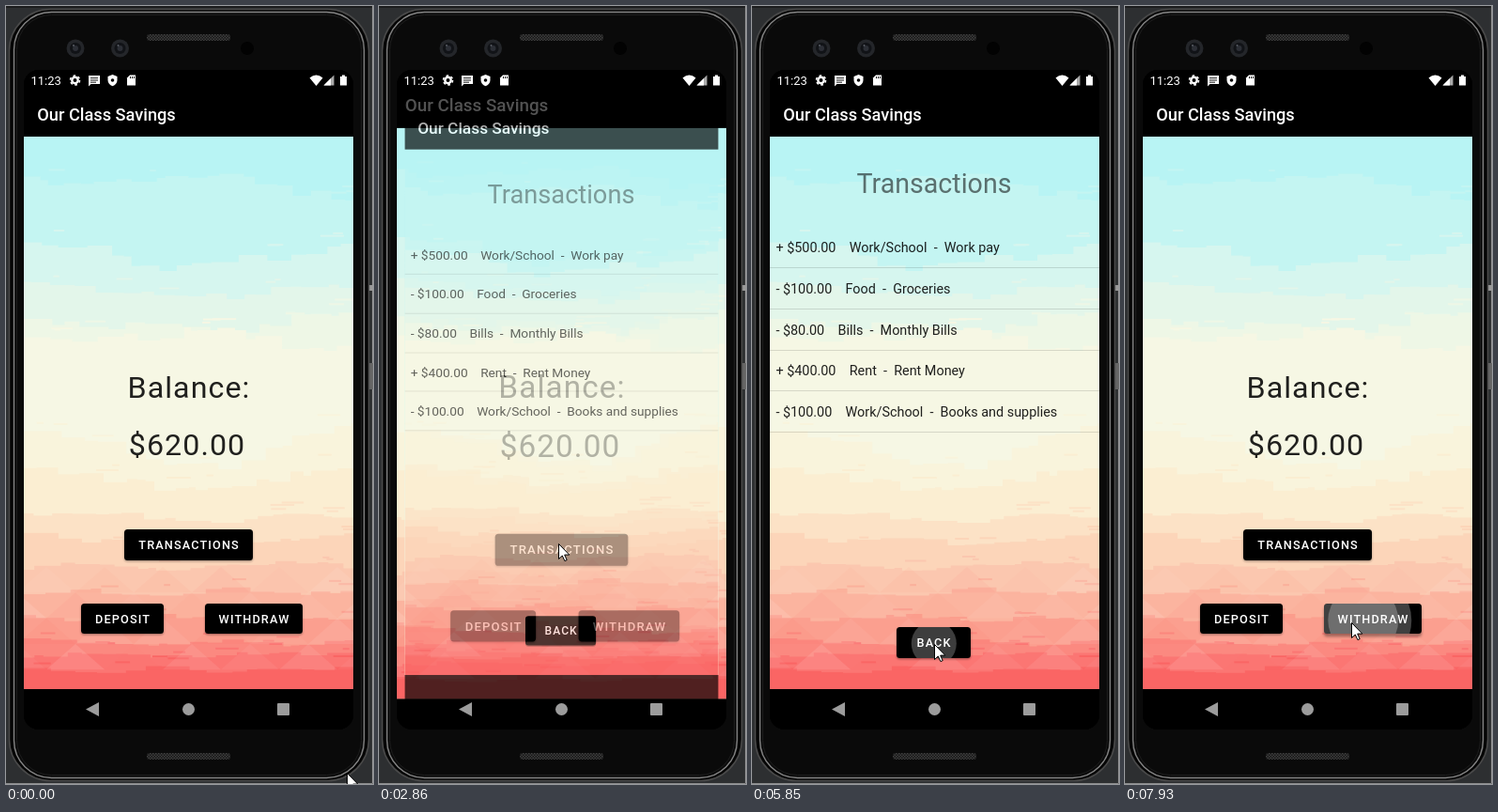
Recreate the animation shown at these times as an HTML page. Size 391 by 828 pixels, loop 8 s.

```html
<!DOCTYPE html>
<html lang="en">
<head>
<meta charset="utf-8">
<title>Balance app</title>
<style>
  html, body { margin: 0; width: 100%; height: 100%; overflow: hidden; background: #2d2f31; }
  svg { display: block; }
  text { font-family: Roboto, "Open Sans", sans-serif; white-space: pre; }
  .title { font-size: 18.2px; font-weight: 500; fill: #fff; }
  .big { font-size: 32.2px; letter-spacing: .033em; fill: #000; fill-opacity: .87; text-anchor: middle; }
  .head { font-size: 28.6px; fill: #000; fill-opacity: .54; text-anchor: middle; }
  .row { font-size: 14.4px; fill: #000; fill-opacity: .87; }
  .label { font-size: 12.7px; font-weight: 500; letter-spacing: .0893em; fill: #fff; text-anchor: middle; }
  .clock { font-size: 13px; fill: #fff; }
</style>
</head>
<body>
<svg width="391" height="828" viewBox="0 0 391 828">
  <defs>
    <clipPath id="glass"><rect x="19" y="68" width="351" height="702" rx="16"/></clipPath>
    <clipPath id="page"><rect x="19" y="139" width="351" height="588"/></clipPath>
    <pattern id="mesh" width="3" height="3" patternUnits="userSpaceOnUse">
      <rect width="3" height="3" fill="#151515"/>
      <path d="M0 0h1.5v1.5h-1.5zM1.5 1.5h1.5v1.5h-1.5z" fill="#3f3f3f"/>
    </pattern>
  </defs>

  <!-- phone body -->
  <rect width="391" height="2" fill="#1c1d1e"/>
  <path d="M390.5 0V827.5H0" fill="none" stroke="#8a8a8a"/>
  <rect x="387" y="297" width="4" height="6" fill="#999"/>
  <rect x="387" y="380" width="4" height="28" fill="#666"/>
  <rect x="3.5" y="3.5" width="383" height="821" rx="44" fill="#050505" stroke="#4a4a4a" stroke-width="1.5"/>
  <rect x="8.5" y="6.500" width="373" height="815" rx="40" fill="#0a0a0a" stroke="#858585" stroke-width="1.4"/>
  <rect x="11.500" y="9.500" width="367" height="809" rx="37" fill="#0a0a0a" stroke="#1d1d1d"/>
  <rect x="150" y="30" width="89" height="7" rx="3" fill="url(#mesh)"/>
  <rect x="150" y="795" width="89" height="7" rx="3" fill="url(#mesh)"/>
  <g id="lenses"></g>
  <circle cx="257" cy="45" r="7" fill="#020202"/>

  <!-- screen -->
  <g clip-path="url(#glass)">
    <rect x="19" y="68" width="351" height="702"/>
    <g id="windows"></g>
    <text class="clock" x="26.5" y="83.6">11:23</text>
    <g fill="#fff">
      <circle cx="73.5" cy="79" r="3.2" fill="none" stroke="#fff" stroke-width="2.4"/>
      <circle cx="73.5" cy="79" r="5" fill="none" stroke="#fff" stroke-width="1.6" stroke-dasharray="2.6 2.636"/>
      <path d="M88 74h12v9h-9.5l-2.5 2.5z"/>
      <path d="M90 76.7h8M90 79h8M90 81.2h6" stroke="#000" stroke-width=".9"/>
      <path d="M113.5 73l5 2v4c0 3-2 5-5 6.2c-3-1.2-5-3.2-5-6.2v-4z"/>
      <circle cx="113.5" cy="79" r="1.8" fill="#000"/>
      <path d="M132 73.5h6v11h-9v-8z"/>
      <path d="M132.5 75v2.2M134.5 75v2.2M136.5 75v2.2" stroke="#000" stroke-width=".9"/>
      <path d="M323.5 76.5q7-6 14 0l-7 8.5z"/>
      <path d="M349.5 73.5v11h-11z" fill="#aaa"/>
      <path d="M346 77v7.5h-7.5z"/>
      <path d="M356 75h2v-1.5h3v1.5h2v9.5h-7z"/>
    </g>
    <g fill="#9c9c9c">
      <path d="M85 748.5L99 741V756Z"/>
      <circle cx="194.5" cy="748.5" r="6.5"/>
      <rect x="289" y="742" width="13" height="13" rx="1"/>
    </g>
  </g>
  <path id="pointer" d="M.5 .5V16.5L4.3 13 6.9 18.6 9.2 17.6 6.7 12.1H11.8Z" fill="#fff" stroke="#000"/>
</svg>

<script>
const $ = id => document.getElementById(id);
const clamp = v => Math.max(0, Math.min(1, v));
const mix = (a, b, k) => a + (b - a) * k;
const LOOP = 8000;

// ---- Painted backdrop ----
let seed = 11;
const rnd = () => (seed = (seed * 16807) % 2147483647) / 2147483647;

// colour, then edge heights at even steps from left to right
const bands = [
  ['#c4f5f2', 186, 190, 184, 180, 198, 204],
  ['#d6f6ef', 250, 256, 284, 270, 265, 250],
  ['#e3f6ea', 298, 300, 308, 310, 300, 296],
  ['#eef7e6', 330, 344, 336, 350, 332, 324],
  ['#f6f7e4', 354, 356, 350, 342, 368, 360],
  ['#f9f4dc', 452, 462, 486, 492, 462, 442],
  ['#fbeed2', 490, 500, 512, 510, 500, 486],
  ['#fce2c6', 542, 538, 546, 550, 540, 544],
  ['#fcd5b9', 562, 570, 566, 574, 568, 562],
  ['#fbc7af', 598, 592, 600, 596, 590, 598],
  ['#fbb49f', 624, 622, 628, 620, 626, 622],
  ['#fb9f8f', 650, 654, 648, 656, 650, 652],
  ['#fb8980', 672, 678, 680, 676, 680, 674],
  ['#fb7673', 692, 688, 694, 690, 688, 692],
  ['#fa6564', 706, 708, 704, 708, 706, 704]
];

function backdrop() {
  let s = '<rect x="19" y="139" width="351" height="588" fill="#b8f4f4"/>';
  for (const [color, ...ys] of bands) {
    const rough = ys[0] < 540 ? 9 : 5;
    let d = 'M19 727', x = 19;
    while (x < 370) {
      const u = (x - 19) / 351 * 5, i = Math.min(4, Math.floor(u));
      const y = mix(ys[i], ys[i + 1], u - i) + (rnd() - .5) * rough;
      d += `V${y.toFixed(1)}`;
      x = Math.min(370, x + 7 + rnd() * 24);
      d += `H${x.toFixed(1)}`;
    }
    s += `<path d="${d}V727Z" fill="${color}"/>`;
    for (let n = 0; n < 5; n++) {
      const i = Math.floor(rnd() * 6);
      s += `<rect x="${(19 + i * 62 + rnd() * 40).toFixed(1)}" y="${(ys[i] - 5 - rnd() * 8).toFixed(1)}"
        width="${(6 + rnd() * 20).toFixed(1)}" height="2" fill="${color}"/>`;
    }
  }
  // faint triangle mosaic in the lower part
  for (let r = 0; r < 4; r++) {
    const top = 597 + r * 27.3, low = top + 27.3;
    for (let c = -1; c < 7; c++) {
      const x = 12 + c * 62 + (r % 2) * 31;
      const tint = rnd() < .4 ? '#fff' : '#f65f58';
      s += `<path d="M${x} ${low}L${x + 31} ${top}L${x + 62} ${low}Z"
        fill="${tint}" opacity="${(.03 + rnd() * .07).toFixed(2)}"/>`;
    }
  }
  return s;
}

// ---- Windows ----
const painted = backdrop();

const button = (id, x, y, w, h, label) => {
  const box = `x="${x}" y="${y}" width="${w}" height="${h}" rx="3.5"`;
  return `<clipPath id="${id}Clip"><rect ${box}/></clipPath>
    <rect id="${id}Shade" ${box} opacity=".35"/>
    <rect id="${id}Face" ${box}/>
    <g clip-path="url(#${id}Clip)" fill="#fff">
      <circle id="${id}Halo" opacity="0"/>
      <circle id="${id}Ring" opacity="0"/>
    </g>
    <text class="label" x="${x + w / 2 + .6}" y="${y + h / 2 + 4.6}">${label}</text>`;
};

const appWindow = (id, content) => `<g id="${id}">
  <g clip-path="url(#page)">${painted}</g>
  <rect x="19" y="68" width="351" height="71"/>
  <rect x="19" y="727" width="351" height="43"/>
  <text class="title" x="33.3" y="121.7">Our Class Savings</text>
  ${content}</g>`;

const rows = [
  '+ $500.00    Work/School  -  Work pay',
  '- $100.00    Food  -  Groceries',
  '- $80.00    Bills  -  Monthly Bills',
  '+ $400.00    Rent  -  Rent Money',
  '- $100.00    Work/School  -  Books and supplies'
].map((line, i) => `<text class="row" x="25.4" y="${262 + i * 43.8}">${line}</text>
  <rect x="19" y="${Math.round(278 + i * 43.8)}" width="351" height="1" opacity=".13"/>`).join('');

$('windows').innerHTML =
  appWindow('home', `
    <text class="big" x="195" y="417">Balance:</text>
    <text class="big" x="193" y="478">$620.00</text>` +
    button('list', 126, 557, 137, 33, 'TRANSACTIONS') +
    button('deposit', 80, 636, 88, 32, 'DEPOSIT') +
    button('withdraw', 212, 636, 104, 32, 'WITHDRAW')) +
  appWindow('history', `<text class="head" x="194" y="198.8">Transactions</text>${rows}` +
    button('back', 154, 661, 79, 33, 'BACK'));

$('lenses').innerHTML = [74, 121.5].map(x =>
  `<circle cx="${x}" cy="45" r="9.5" fill="#24262a"/><circle cx="${x}" cy="45" r="6" fill="#111317"/>
   <circle cx="${x}" cy="45" r="3" fill="#2c2f36"/><circle cx="${x - 2}" cy="42" r="1" fill="#5a5e66"/>`).join('');

const ticks = [0, 570, 690, 820, 940, 1090, 1210, 1350, 1480, 1600, 1730, 1850, 2000,
  2290, 2420, 2560, 2710, 2860, 3010, 3130, 4280, 4430, 4560, 4730, 4880, 5000,
  5850, 5980, 6100, 6250, 6380, 6510, 6660, 6780, 7070, 7220, 7340, 7490, 7930];

// pointer: time, x, y
const trail = [
  [440, 363, 816], [940, 311, 785], [1210, 268, 745], [1850, 192, 577], [2000, 191, 572],
  [4130, 191, 572], [4280, 191, 580], [4560, 191, 617], [4730, 191, 650], [5000, 194, 679],
  [6930, 194, 679], [7070, 198, 679], [7340, 231, 662], [7490, 241, 656]
];

const presses = [
  { id: 'list', at: 2198, hold: 270, x: 191, y: 573 },
  { id: 'back', at: 5766, hold: 420, x: 194, y: 679 },
  { id: 'withdraw', at: 7805, hold: 300, x: 241, y: 656 },
  { id: 'deposit', at: LOOP, hold: 0, x: 0, y: 0 }
];

const cubic = (a, b, c, d, s) => {
  const r = 1 - s;
  return a * r * r * r + 3 * b * r * r * s + 3 * c * r * s * s + d * s * s * s;
};

// fast start, very long settle
function ease(x) {
  const [px, py] = x < 1 / 6
    ? [[0, .05, .1333, 1 / 6], [0, 0, .06, .4]]
    : [[1 / 6, .2083, .25, 1], [.4, .82, 1, 1]];
  let lo = 0, hi = 1;
  for (let i = 0; i < 24; i++) {
    const m = (lo + hi) / 2;
    if (cubic(...px, m) < x) lo = m; else hi = m;
  }
  return cubic(...py, lo);
}

function scale(el, k, alpha) {
  el.setAttribute('transform', `translate(194.5 419) scale(${k}) translate(-194.5 -419)`);
  el.setAttribute('opacity', alpha);
}

function swap(from, to, p) {
  const k = p > 340 ? 1 : ease(clamp(p / 400));
  scale(from, 1 + .05 * k, 1);
  scale(to, .85 + .15 * k, clamp((p - 50) / 50));
  if (to.nextElementSibling) to.parentNode.append(to);
}

function disc(el, x, y, r, alpha) {
  el.setAttribute('cx', x);
  el.setAttribute('cy', y);
  el.setAttribute('r', r);
  el.setAttribute('opacity', alpha);
}

function press({ id, at, hold, x, y }, t) {
  const p = t - at, q = clamp(p / 225);
  const on = p > 0 ? clamp(p / 75) * (1 - clamp((p - hold) / 190)) : 0;
  const deep = on * clamp((p - 95) / 25);
  const face = $(id + 'Face').getBBox(), shade = $(id + 'Shade');
  const cx = mix(x, face.x + face.width / 2, q), cy = mix(y, face.y + face.height / 2, q);
  const r = Math.hypot(face.width, face.height) / 2 * mix(.3, 1, q);
  disc($(id + 'Ring'), cx, cy, r, .24 * on);
  disc($(id + 'Halo'), cx, cy, r + 14, .25 * deep);
  shade.setAttribute('transform', `translate(0 ${1.2 + 2 * deep})`);
  shade.style.filter = `blur(${.8 + deep}px)`;
}

function movePointer(t) {
  let i = 0;
  while (i < trail.length - 2 && t > trail[i + 1][0]) i++;
  const [t0, x0, y0] = trail[i], [t1, x1, y1] = trail[i + 1];
  const k = clamp((t - t0) / (t1 - t0));
  $('pointer').setAttribute('transform',
    `translate(${Math.round(mix(x0, x1, k))} ${Math.round(mix(y0, y1, k))})`);
}

const home = $('home'), past = $('history');
const OPEN = 2776, CLOSE = 6360;
let shown = -1;

function draw(now) {
  const time = now % LOOP;
  const t = ticks.filter(v => v <= time).pop();
  if (t === shown) return;
  shown = t;
  if (t < OPEN) swap(past, home, LOOP);
  else if (t < CLOSE) swap(home, past, t - OPEN);
  else swap(past, home, t - CLOSE);
  presses.forEach(b => press(b, t));
  movePointer(t);
}

const start = performance.now();
function frame() {
  draw(performance.now() - start);
  requestAnimationFrame(frame);
}
frame();
</script>
</body>
</html>
```
